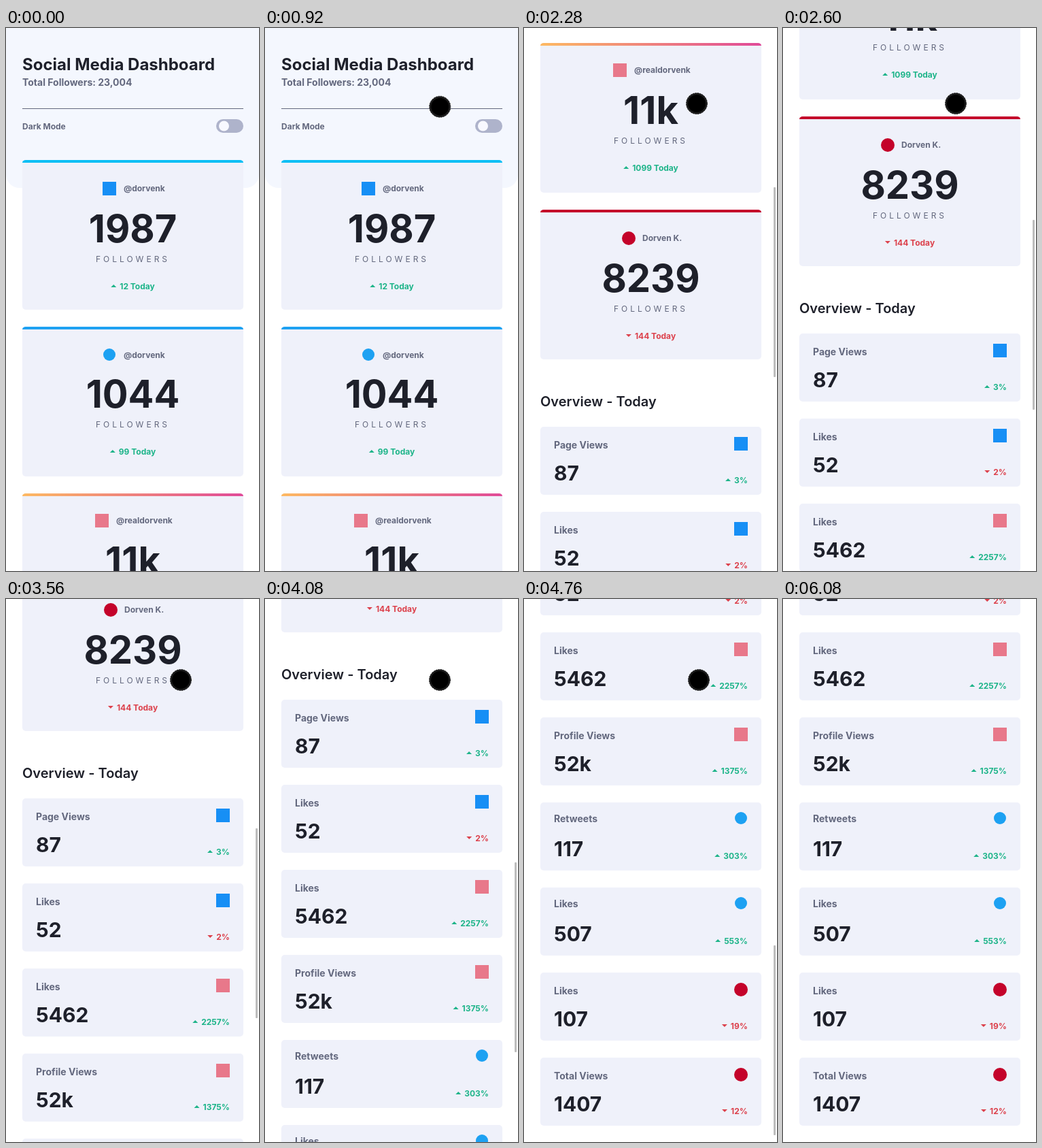
These frames come from a looping animation (372x798 px, 6.12 s). An HTML page:

```html
<!DOCTYPE html>
<html lang="en">
<head>
<meta charset="utf-8">
<title>Social Media Dashboard</title>
<style>
  html, body { margin: 0; width: 100%; height: 100%; overflow: hidden; background: #fff; }
  svg { display: block; width: 372px; height: 798px; }
  text { font-family: Inter, "Open Sans", sans-serif; font-weight: 700; font-optical-sizing: none; }
</style>
</head>
<body>
<svg id="stage" viewBox="0 0 372 798">
  <defs>
    <linearGradient id="sunset"><stop stop-color="#fdb962"/><stop offset="1" stop-color="#e04a98"/></linearGradient>
  </defs>
  <g id="page"></g>
  <rect id="bar" x="367" width="3" height="279" rx="1" fill="#bcbcbc"/>
  <g id="cursor">
    <circle r="15.5" fill="#1c1c1c" stroke="#222" stroke-dasharray="2 1.5"/>
    <circle r="13"/>
  </g>
</svg>
<script>
const LOOP = 6120, MAX_SCROLL = 1449, MID = 186.5;
const INK = '#1e202a', GREY = '#63687e', CARD = '#eff1fa', UP = '#1db489', DOWN = '#dc414c';
const page = document.getElementById('page');
const bar = document.getElementById('bar');
const cursor = document.getElementById('cursor');

const add = markup => {
  page.insertAdjacentHTML('beforeend', markup);
  return page.lastElementChild;
};
const text = (x, y, size, fill, str, extra = '') =>
  add(`<text x="${x}" y="${y}" font-size="${size}" fill="${fill}" ${extra}>${str}</text>`);
const centred = 'text-anchor="middle"';

// Plain marks standing for each network, centred on x, y
const square = (color, rx = 0) => (x, y) =>
  add(`<rect x="${x - 10}" y="${y - 10}" width="20" height="20" rx="${rx}" fill="${color}"/>`);
const disc = (color, r) => (x, y) => add(`<circle cx="${x}" cy="${y}" r="${r}" fill="${color}"/>`);
const blue = square('#178ff5'), sky = disc('#1da1f2', 9);
const pink = square('#e8788a'), red = disc('#c4032a', 10);

// Arrow plus label; align 0.5 centres the pair on x, 1 ends it there
function trend(x, y, str, rising, align) {
  const color = rising ? UP : DOWN;
  const label = text(0, y, 12, color, str);
  const left = x - (label.getComputedTextLength() + 13) * align;
  label.setAttribute('x', left + 13);
  add(`<path fill="${color}" d="M${left} ${y - (rising ? 3 : 7)}h8l-4 ${rising ? -4 : 4}z"/>`);
}

function bigCard(y, top, mark, markX, markY, name, nameX, nameY, count, today, rising, shift) {
  add(`<rect x="24" y="${y}" width="325" height="220" rx="5" fill="${CARD}"/>`);
  add(`<path fill="${top}" d="M24 ${y + 4}a5 4 0 0 1 5-4H344a5 4 0 0 1 5 4z"/>`);
  mark(markX, y + markY);
  text(nameX, y + nameY, 12, GREY, name);
  text(MID, y + 121 - shift, 56, INK, count, centred);
  text(MID, y + 150 - shift, 12, GREY, 'FOLLOWERS', centred + ' style="font-weight:400;letter-spacing:4px"');
  trend(MID, y + 190 - shift, today + ' Today', rising, 0.5);
}

function smallCard(y, label, count, mark, change, rising) {
  const lift = mark === sky ? 3 : 0;
  add(`<rect x="24" y="${y}" width="325" height="100" rx="5" fill="${CARD}"/>`);
  text(44, y + 32 - lift, 14, GREY, label);
  text(44, y + 79, 30, INK, count);
  mark(319, y + (lift ? 23 : 25));
  trend(329, y + 83, change + '%', rising, 1);
}

add('<path fill="#f4f7fe" d="M0 0H372V215a20 20 0 0 1-20 20H20a20 20 0 0 1-20-20z"/>');
text(24, 62, 24, INK, 'Social Media Dashboard');
text(24, 85, 14, GREY, 'Total Followers: 23,004');
add(`<rect x="24" y="118" width="325" height="1" fill="${GREY}"/>`);
text(24, 149, 12, GREY, 'Dark Mode');
add('<rect x="309" y="134" width="40" height="20" rx="10" fill="#aeb3cb"/>');
add('<circle cx="320.5" cy="144" r="7.5" fill="#f8f9ff"/>');

bigCard(194, '#0bbff5', blue, 152, 42, '@dorvenk', 173, 46, '1987', 12, true, 0);
bigCard(439, '#1da1f2', sky, 152, 41, '@dorvenk', 173, 46, '1044', 99, true, 2);
bigCard(684, 'url(#sunset)', pink, 141, 40, '@realdorvenk', 162, 44, '11k', 1099, true, 2);
bigCard(929, '#c4032a', red, 154, 42, 'Dorven K.', 174, 46, '8239', 144, false, 0);

text(24, 1218, 20, INK, 'Overview - Today', 'style="font-weight:600"');
[
  ['Page Views', '87', blue, 3, true],
  ['Likes', '52', blue, 2, false],
  ['Likes', '5462', pink, 2257, true],
  ['Profile Views', '52k', pink, 1375, true],
  ['Retweets', '117', sky, 303, true],
  ['Likes', '507', sky, 553, true],
  ['Likes', '107', red, 19, false],
  ['Total Views', '1407', red, 12, false]
].forEach((row, i) => smallCard(1248 + 125 * i, ...row));

const clamp = v => Math.max(0, Math.min(1, v));
const progress = (t, from, to) => clamp((t - from) / (to - from));
const easeOut = p => 1 - (1 - p) ** 2;

// Each wheel notch scrolls 100px with an ease-out
const notches = [1070, 1125, 1180, 1570, 1780, 1990, 2200, 2411, 3050, 3492, 3800, 4160, 4270, 4380, 4490];
const scrollAt = t => Math.min(MAX_SCROLL, Math.round(
  notches.reduce((sum, start) => sum + 100 * easeOut(progress(t, start, start + 210)), 0)));

// Pointer stops: time, x, y
const stops = [[40, 390, 250], [200, 336, 230], [440, 336, 230], [1040, 254, 111],
  [3000, 254, 111], [3200, 257, 119], [4960, 257, 119], [5200, 262, -20]];
function pointerAt(t) {
  let [, x, y] = stops[0];
  for (let i = 1; i < stops.length; i++) {
    const p = easeOut(progress(t, stops[i - 1][0], stops[i][0]));
    x += (stops[i][1] - stops[i - 1][1]) * p;
    y += (stops[i][2] - stops[i - 1][2]) * p;
  }
  return `translate(${x} ${y})`;
}

const begin = performance.now();
function draw() {
  const t = (performance.now() - begin) % LOOP;
  const scroll = scrollAt(t);
  page.setAttribute('transform', `translate(0 ${-scroll})`);
  bar.setAttribute('y', Math.round(3 + scroll * 0.3493));
  bar.setAttribute('opacity', t < 1070 ? 0 : 1 - progress(t, 5000, 5300));
  cursor.setAttribute('transform', pointerAt(t));
  requestAnimationFrame(draw);
}
draw();
</script>
</body>
</html>
```
